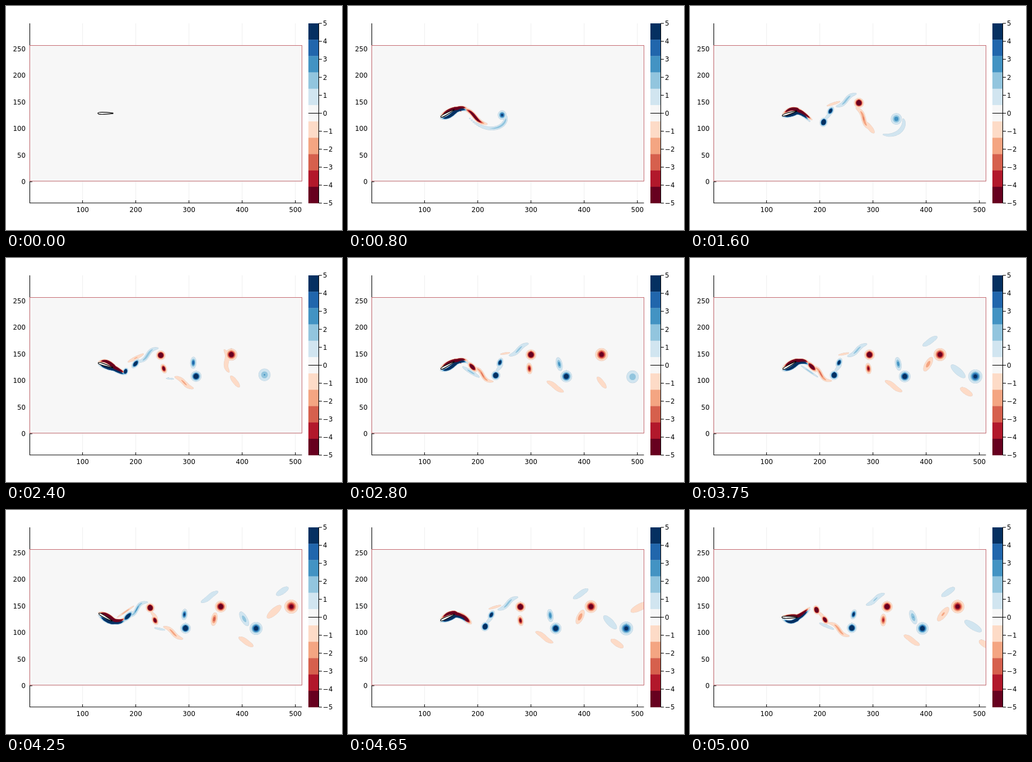
Write an HTML page with a canvas that moves like this. It is 600 by 400 pixels and loops after 5.05 s.

```html
<!DOCTYPE html>
<html lang="en">
<head>
<meta charset="utf-8">
<title>Vorticity behind a pitching foil</title>
<style>
  html, body { margin: 0; width: 100%; height: 100%; overflow: hidden; background: #fff; }
  canvas { display: block; }
</style>
</head>
<body>
<canvas id="stage" width="600" height="400"></canvas>
<script>
const ctx = document.getElementById('stage').getContext('2d');
const { PI, sin, cos, exp, min, max, log, sqrt } = Math;
const LOOP = 5050, STEP = 50, PERIOD = 1000;
const BACK = '#f7f7f7';
// Index 0 is the faint contour edge, 1 to 5 are the filled bands.
const RED = ['#dfcdc5', '#fddbc7', '#f4a582', '#d6604d', '#b2182b', '#67001f'];
const BLUE = ['#bccdd9', '#d1e5f0', '#92c5de', '#4393c3', '#2166ac', '#053061'];
const FIRST_LEVEL = 5 / 11;
const MIDLINE = 192;
const PIVOT = 178, TRAILING_EDGE = 191;

// Tilted spine with an optional S-bend; u runs from -1 to 1.
const bar = (x, y, half, tilt, bend = 0) => u => {
  const across = bend * sin(PI * u);
  return [
    x + half * u * cos(tilt) - across * sin(tilt),
    y + half * u * sin(tilt) + across * cos(tilt)
  ];
};

// Parts shed once per half period, as functions of age in periods.
// Heights are relative to the midline for the red, upward stroke.
const vortex = a => ({
  spine: bar(226 + 126 * a, -19.5 + 6 * exp(-4 * a), 1.5 + 4 * exp(-20 * a * a), 1.2),
  width: (7.6 + 2 * a) * (1 - .25 * exp(-5 * a)),
  peak: 4 + 10 * exp(-1.1 * a)
});
const satellite = a => ({
  spine: bar(238 + 107 * a + 3 * exp(-3 * a), 4 + 6 * a - 5.5 * a * a,
    4 + 5 * a + 3 * exp(-4 * a), .95 + .65 * a),
  width: 5 + .4 * a,
  peak: 9 * exp(-.9 * a)
});
const tail = a => ({
  spine: bar(266 + 130 * a, 21.5 + 25 * a - 6 * a * a, 22 - 6 * a, .56, 3 * exp(-1.5 * a)),
  width: 3.5 + .8 * a,
  peak: .8 + 1.3 * exp(-1.3 * a)
});
const wisp = a => ({
  spine: bar(244 + 122 * a, 15.5 + 20 * a, 14 - 18 * a, .4 - .8 * a),
  width: 2.4 - 3 * a,
  peak: 1.2 * exp(-2 * a)
});
const link = a => ({
  spine: bar(235 + 118 * a, -4, 8, .8),
  width: 2.6,
  peak: 1.3 * exp(-3 * a)
});

// [shape, birth age, first half period, opposite sign]
const shedParts = [
  [tail, -.35, 4], [wisp, -.3, 3, true], [link, -.1, 3],
  [satellite, -.45, 3], [vortex, -.25, 2]
];

// The starting wake, as functions of time in periods.
const startX = t => 182 + 116.5 * t;
const startY = t => -4.5 + 8.8 * t + 5 * exp(-4 * t);
const startVortex = t => ({
  spine: bar(startX(t), startY(t), 3, PI / 2),
  width: 10.8 - 9.5 * exp(-1.3 * t),
  peak: 1.8 + 6 * exp(-t)
});
const startSpiral = t => {
  const inner = max(3, 8.75 * t - 2), outer = max(inner, min(100 * t, 85 - 30 * t));
  return {
    spine: u => {
      const s = (u + 1) / 2, angle = s * (3.9 - t), r = inner * (outer / inner) ** s;
      return [startX(t) + r * cos(angle), startY(t) + r * sin(angle)];
    },
    width: 3.4,
    peak: 4 * exp(-.85 * t)
  };
};
const startStreak = t => {
  const s = t - .8;
  return {
    spine: bar(226 + 105 * s, 5 + 18 * s - 16.4 * s * s, 27 - 4 * s, .55 + .5 * s, 3),
    width: 4,
    peak: 1 + 8 * exp(-2.2 * s)
  };
};
const startLobe = t => ({
  spine: bar(321 + 110 * (t - 1.6), 25 + 4.5 * (t - 1.6), 12, .9),
  width: 4,
  peak: 1.1
});
const startCrest = t => {
  const { spine, ...rest } = tail(t - 1.5);
  return { ...rest, spine: u => { const [x, y] = spine(u); return [x, -y]; } };
};
// [colors, shape, first time, last time]
const startParts = [
  [BLUE, startSpiral, .05, 2], [BLUE, startVortex, 0, 4], [BLUE, startCrest, 1.15, 2.2],
  [RED, startStreak, .5, 2.7], [RED, startLobe, 1.5, 4]
];

const pitch = time => PI / 6 * sin(2 * PI * time);

// The foil chord continues as a growing travelling wave behind the trailing edge.
function camber(x, time) {
  const d = x - TRAILING_EDGE;
  if (d < 0) return (x - PIVOT) * sin(pitch(time));
  return (6.4 + .2 * d + .01 * d * d) * sin(2 * PI * (time - d / 95));
}

// Shear layer on one side of the foil; side is -1 above and 1 below.
function shearLayer(side, time) {
  const bulge = 3.6 - 2.6 * cos(2 * PI * (time + .03 + (side > 0 ? .5 : 0)));
  return {
    spine: u => {
      const x = 189.5 + 25 * u;
      const chord = min(1, (x - 164) / 30);
      const offset = 1.7 + bulge * sin(PI * chord);
      return [x, camber(x, time) + side * offset];
    },
    width: 3.7,
    peak: 60,
    reach: min(1, .45 + 2.4 * time)
  };
}

function place(colors, { spine, width, peak, reach = 1 }, flip = 1) {
  const count = 48, points = [];
  for (let i = 0; i <= count * reach; i++) {
    const u = 2 * i / count - 1, [x, y] = spine(u);
    points.push([x, MIDLINE + flip * y, 1 - u * u]);
  }
  return { colors, width, points, strength: log(peak / FIRST_LEVEL) };
}

// A Gaussian cross-section gives each contour level its own half-width.
function fillLevel({ colors, width, points, strength }, level) {
  if (strength <= 0 || width <= 0) return;
  const loss = level > 1 ? log(2 * level - 1) / strength : 0;
  ctx.beginPath();
  for (const [x, y, taper] of points) {
    if (taper <= loss) continue;
    const r = width * sqrt(taper - loss) + (level ? 0 : .35);
    ctx.moveTo(x + r, y);
    ctx.arc(x, y, r, 0, 2 * PI);
  }
  ctx.fillStyle = colors[level];
  ctx.fill();
}

function drawWake(time) {
  if (time === 0) return;
  const shapes = [];
  for (const [colors, shape, from, to] of startParts)
    if (time > from && time < to) shapes.push(place(colors, shape(time)));
  for (const [shape, birth, first, opposite] of shedParts) {
    for (let n = first; n / 2 + birth < time; n++) {
      const age = time - n / 2, upward = n % 2 === 0;
      if (age > 2.7) continue;
      const part = shape(age);
      part.width *= min(1, (age - birth) / .1);
      shapes.push(place(upward !== Boolean(opposite) ? RED : BLUE, part, upward ? 1 : -1));
    }
  }
  shapes.push(place(BLUE, shearLayer(1, time)), place(RED, shearLayer(-1, time)));
  for (let level = 0; level <= 5; level++)
    for (const shape of shapes) fillLevel(shape, level);
}

function drawFoil(time) {
  ctx.save();
  ctx.translate(PIVOT, 191.6);
  ctx.rotate(pitch(time));
  ctx.beginPath();
  ctx.moveTo(-14, 0);
  ctx.bezierCurveTo(-14, -2.7, -3, -2.2, 13, -.5);
  ctx.lineTo(13, .5);
  ctx.bezierCurveTo(-3, 2.2, -14, 2.7, -14, 0);
  ctx.fillStyle = BACK;
  ctx.fill();
  ctx.lineWidth = 1.2;
  ctx.strokeStyle = '#000';
  ctx.stroke();
  ctx.restore();
}

function line(x1, y1, x2, y2, color = '#000') {
  ctx.beginPath();
  ctx.moveTo(x1, y1);
  ctx.lineTo(x2, y2);
  ctx.strokeStyle = color;
  ctx.lineWidth = 1.1;
  ctx.stroke();
}

function label(text, x, y, align) {
  ctx.fillStyle = '#000';
  ctx.textAlign = align;
  ctx.fillText(text, x, y);
}

function drawAxes() {
  ctx.font = '11.8px "DejaVu Sans", sans-serif';
  line(42.5, 314, 528, 314, '#f0f0f0');
  line(42.5, 31, 42.5, 352);
  line(42, 351.8, 528.5, 351.8);
  line(42.5, 313.8, 47, 313.8);
  for (let i = 1; i <= 5; i++) {
    const x = 41.7 + 95 * i;
    line(x, 31, x, 347, '#f0f0f0');
    line(x, 347, x, 351.8);
    label(100 * i, x, 367.8, 'center');
  }
  for (let i = 0; i <= 5; i++) label(50 * i, 35, 318.2 - 47.45 * i, 'right');
}

function drawColorBar() {
  const bands = [...BLUE.slice(1).reverse(), BACK, ...RED.slice(1)];
  const height = 321 / bands.length;
  bands.forEach((color, i) => {
    ctx.fillStyle = color;
    ctx.fillRect(540, 31 + i * height, 18, height + .3);
  });
  line(540, 191.5, 558, 191.5);
  line(558.5, 31, 558.5, 352);
  for (let v = -5; v <= 5; v++) {
    const y = 191.5 - 32.1 * v;
    line(558.5, y, 564, y);
    label(v < 0 ? '\u2212' + -v : v, 566, y + 4.2, 'left');
  }
}

function draw(time) {
  ctx.fillStyle = '#fff';
  ctx.fillRect(0, 0, 600, 400);
  drawAxes();
  drawColorBar();
  ctx.save();
  ctx.beginPath();
  ctx.rect(42.5, 70.5, 486, 242.2);
  ctx.fillStyle = BACK;
  ctx.fill();
  ctx.clip();
  drawWake(time);
  drawFoil(time);
  ctx.restore();
  ctx.strokeStyle = '#c4686f';
  ctx.lineWidth = 1;
  ctx.strokeRect(42.5, 70.5, 486, 242.2);
}

function tick() {
  const now = performance.now() % LOOP;
  draw(Math.floor(now / STEP) * STEP / PERIOD);
  requestAnimationFrame(tick);
}
tick();
</script>
</body>
</html>
```
